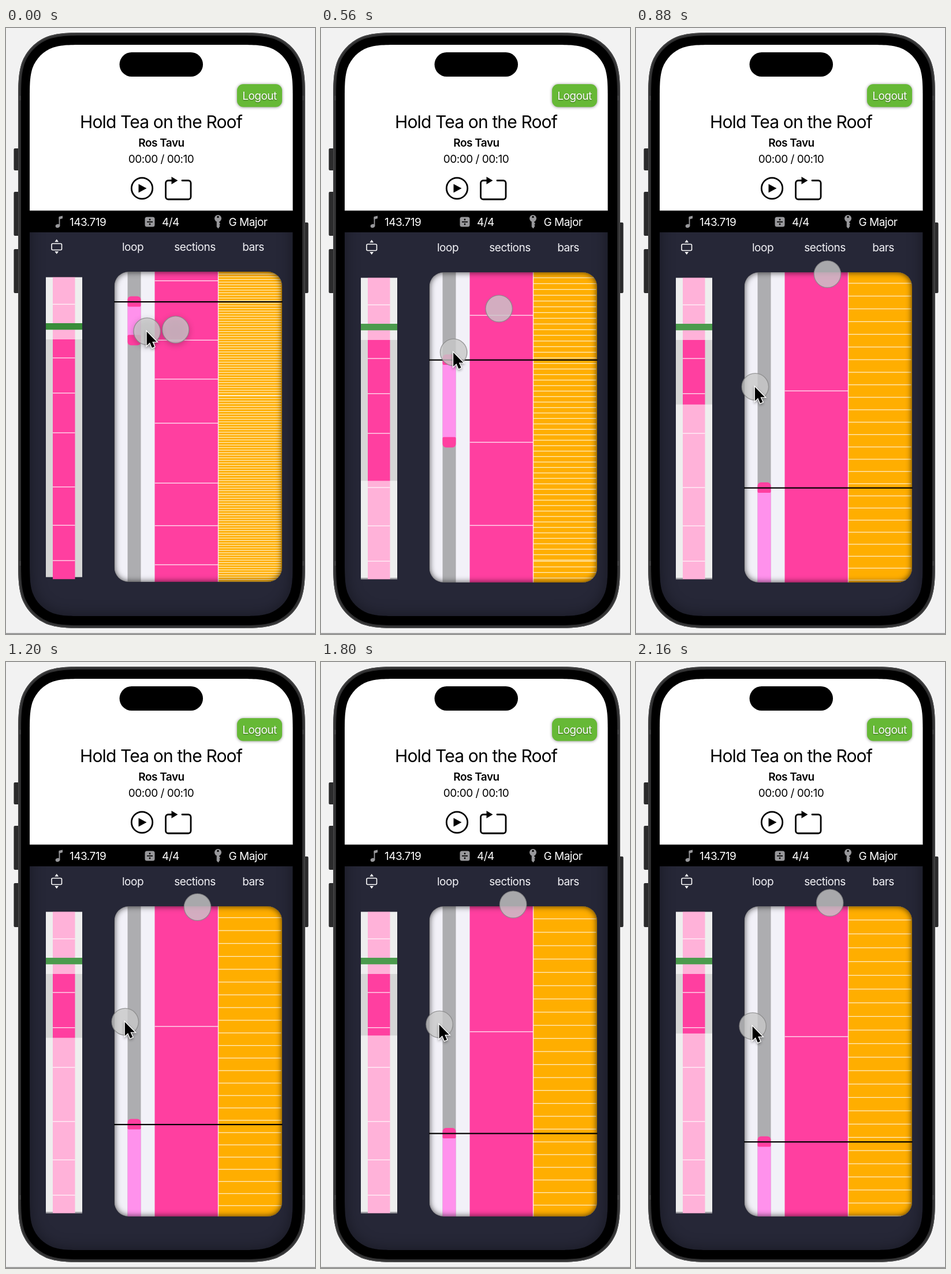
Recreate the animation shown at these times as an HTML page with a canvas. Size 535 by 1047 pixels, loop 2200 ms.

```html
<!DOCTYPE html>
<html lang="en">
<head>
<meta charset="utf-8">
<title>Pinch zoom</title>
<style>
  html, body { margin: 0; width: 100%; height: 100%; overflow: hidden; background: #f2f2f2; }
  canvas { display: block; width: 535px; height: 1047px; }
</style>
</head>
<body>
<canvas id="stage"></canvas>
<script>
const W = 535, H = 1047, LOOP = 2200, STEP = 40;
const canvas = document.getElementById('stage');
const ctx = canvas.getContext('2d');
const dpr = window.devicePixelRatio || 1;
canvas.width = W * dpr;
canvas.height = H * dpr;

const PINK = '#ff3fa0', LILAC = '#ff91ec', NAVY = '#262737', AMBER = '#ffae00';

// Pinch over time: [ms, zoom, half finger distance x, y]
const pinch = [
  [0, 1.108, 24.75, 1.5],
  [400, 1.412, 31.5, 17.5],
  [560, 2.367, 39.25, 37.75],
  [880, 5.165, 62.5, 97.25],
  [1200, 5.222, 62.6, 99],
  [1800, 5.418, 63.75, 103.5],
  [2160, 5.602, 66.75, 106.5]
];
const MID = { x: 268.9, y: 522.6 };
const IDLE_END = 120;

// Positions along the song, in overview pixels
const sections = [46.65, 139.3, 200, 268.7, 362.2, 428.5, 489.5];
const loopStart = 79, loopEnd = 139.3, songLength = 520.5;
const bars = [];
for (let k = -2; k <= 23; k++) bars.push(10.65 + 4.3 * k - 0.0068 * k * k);
for (let k = 1; k <= 30; k++) bars.push(106 + 3.977 * k);
for (let k = 0; k < 76; k++) bars.push(226.2 + 4.07 * k - 0.002 * k * k);

// Monotone cubic through one column of the key list
function track(t, col) {
  const n = pinch.length - 1;
  if (t >= pinch[n][0]) return pinch[n][col];
  const slope = i => (pinch[i + 1][col] - pinch[i][col]) / (pinch[i + 1][0] - pinch[i][0]);
  const tangent = i => {
    if (i === 0) return slope(0) * 0.4;
    if (i === n) return slope(n - 1);
    const a = slope(i - 1), b = slope(i);
    return a * b <= 0 ? 0 : 2 * a * b / (a + b);
  };
  let i = 0;
  while (t >= pinch[i + 1][0]) i++;
  const h = pinch[i + 1][0] - pinch[i][0], u = (t - pinch[i][0]) / h;
  const u2 = u * u, u3 = u2 * u;
  return (2 * u3 - 3 * u2 + 1) * pinch[i][col] + (u3 - 2 * u2 + u) * h * tangent(i) +
    (3 * u2 - 2 * u3) * pinch[i + 1][col] + (u3 - u2) * h * tangent(i + 1);
}

function rect(x, y, w, h, fill) {
  ctx.fillStyle = fill;
  ctx.fillRect(x, y, w, h);
}

function round(x, y, w, h, r, fill, stroke, width) {
  ctx.beginPath();
  ctx.roundRect(x, y, w, h, r);
  if (fill) { ctx.fillStyle = fill; ctx.fill(); }
  if (stroke) { ctx.strokeStyle = stroke; ctx.lineWidth = width; ctx.stroke(); }
}

// Rounded box whose corners ease into the straight sides
function smoothBox(x, y, w, h, r) {
  const far = 1.5287 * r, c1 = 1.0885 * r, c2 = 0.8684 * r;
  const p = 0.6315 * r, q = 0.0749 * r, s = 0.3728 * r, v = 0.1691 * r;
  const corners = [[x, y, 1, 0, 0, 1], [x + w, y, 0, 1, -1, 0],
    [x + w, y + h, -1, 0, 0, -1], [x, y + h, 0, -1, 1, 0]];
  const path = new Path2D();
  corners.forEach(([cx, cy, ax, ay, bx, by], i) => {
    // a runs along the leaving side, b along the arriving side
    const at = (a, b) => [cx + ax * a + bx * b, cy + ay * a + by * b];
    const curve = (...pts) => path.bezierCurveTo(...pts.flat());
    if (i) path.lineTo(...at(0, far)); else path.moveTo(...at(0, far));
    curve(at(0, c1), at(0, c2), at(q, p));
    curve(at(v, s), at(s, v), at(p, q));
    curve(at(c2, 0), at(c1, 0), at(far, 0));
  });
  path.closePath();
  return path;
}

function shape(points, fill) {
  ctx.beginPath();
  points.forEach(([x, y]) => ctx.lineTo(x, y));
  ctx.closePath();
  ctx.fillStyle = fill;
  ctx.fill();
}

function disc(x, y, r, fill) {
  ctx.beginPath();
  ctx.arc(x, y, r, 0, 7);
  ctx.fillStyle = fill;
  ctx.fill();
}

function text(str, x, y, size, color, weight = 400, align = 'center', spacing = -0.5) {
  ctx.font = `${weight} ${size}px Inter, "Open Sans", sans-serif`;
  ctx.letterSpacing = spacing + 'px';
  ctx.textAlign = align;
  ctx.textBaseline = 'alphabetic';
  ctx.fillStyle = color;
  ctx.fillText(str, x, y);
}

function shadow(color, blur, y = 0) {
  ctx.shadowColor = color;
  ctx.shadowBlur = blur * dpr;
  ctx.shadowOffsetY = y * dpr;
}

// Dark blurred edge along the inside of a box path
function innerShadow(box, color, blur) {
  const ring = new Path2D();
  ring.rect(-60, -60, W + 120, H + 120);
  ring.addPath(box);
  ctx.save();
  ctx.clip(box);
  shadow(color, blur);
  ctx.fillStyle = '#000';
  ctx.fill(ring, 'evenodd');
  ctx.restore();
}

function drawPhone() {
  rect(0, 0, W, H, '#f2f2f2');
  rect(0, 1045.5, W, 1.5, '#8a8a8a');
  [[208, 38], [283, 76], [382, 76]].forEach(([y, h]) => round(13.5, y, 10, h, 2, '#2b2b2c'));
  round(514, 336, 9.5, 122, 2, '#2b2b2c');

  const shell = smoothBox(21, 8, 497, 1029, 83);
  ctx.save();
  ctx.clip(shell);
  rect(21, 8, 497, 1029, '#303031');
  rect(21, 117, 497, 8, '#3d3d3e');
  rect(21, 921, 497, 8, '#3d3d3e');
  ctx.strokeStyle = '#414142';
  ctx.lineWidth = 4;
  ctx.stroke(shell);
  ctx.restore();
  ctx.fillStyle = '#000';
  ctx.fill(smoothBox(26, 13, 487, 1019, 78));

  const screen = smoothBox(41, 29, 455.5, 987, 64);
  ctx.save();
  ctx.clip(screen);
  rect(41, 29, 456, 287, '#fff');
  rect(41, 315.5, 456, 38, '#000');
  rect(41, 353, 456, 664, NAVY);
  ctx.restore();
  ctx.save();
  ctx.beginPath();
  ctx.rect(41, 353, 456, 664);
  ctx.clip();
  innerShadow(screen, 'rgba(0,0,0,.4)', 26);
  ctx.restore();
  round(196.5, 42, 144.5, 42, 21, '#000');
}

function drawHeader() {
  ctx.save();
  shadow('rgba(0,0,0,.45)', 5, 0.5);
  round(400, 97, 78, 39.5, 11, '#66b936');
  ctx.restore();
  ctx.save();
  shadow('rgba(0,0,0,.45)', 2, 0.5);
  text('Logout', 439, 124, 19, '#fff');
  ctx.restore();

  text('Hold Tea on the Roof', 268.5, 173, 30, '#000', 400, 'center', -0.85);
  text('Ros Tavu', 269, 205, 19, '#000', 600);
  text('00:00 / 00:10', 268.5, 233, 19, '#000');

  ctx.strokeStyle = '#000';
  ctx.lineWidth = 2.8;
  ctx.lineCap = ctx.lineJoin = 'round';
  ctx.beginPath();
  ctx.arc(235.5, 277, 18.2, 0, 7);
  ctx.stroke();
  shape([[229.5, 269.5], [243.5, 277], [229.5, 284.5]], '#000');

  ctx.beginPath();
  ctx.moveTo(305, 263.5);
  ctx.arcTo(320, 263.5, 320, 280, 4.5);
  ctx.arcTo(320, 296, 300, 296, 4.5);
  ctx.arcTo(276.5, 296, 276.5, 280, 4.5);
  ctx.arcTo(276.5, 263.5, 290, 263.5, 4.5);
  ctx.lineTo(288, 263.5);
  ctx.stroke();
  shape([[286.5, 257], [297.5, 263.5], [286.5, 270]], '#000');
}

function drawInfo() {
  const grey = '#98989b';
  ctx.beginPath();
  ctx.ellipse(89.5, 342, 3.9, 3.1, -0.3, 0, 7);
  ctx.fillStyle = grey;
  ctx.fill();
  rect(91.6, 327, 1.8, 15, grey);
  shape([[91.6, 326], [98, 324.5], [98, 329], [91.6, 330.7]], grey);
  text('143.719', 110, 342, 19, '#fff', 400, 'left');

  round(240.5, 326.5, 17, 17, 3.5, grey);
  rect(244, 334.2, 10, 1.7, '#000');
  disc(249, 331, 1.4, '#000');
  disc(249, 339, 1.4, '#000');
  text('4/4', 270, 342, 19, '#fff', 400, 'left');

  disc(367, 329, 6, grey);
  disc(367, 326.5, 1.7, '#000');
  shape([[364.7, 332], [369.3, 332], [369.3, 336], [371, 338], [369.3, 340], [370.5, 342],
    [367.5, 346.5], [364.7, 343.5]], grey);
  text('G Major', 385.5, 342, 19, '#fff', 400, 'left');
}

function drawLabels() {
  round(79, 373.5, 17.5, 11, 2, null, '#fff', 1.6);
  shape([[87.7, 366], [91, 370.5], [84.4, 370.5]], '#fff');
  shape([[87.7, 391.5], [91, 387], [84.4, 387]], '#fff');
  text('loop', 219.5, 386, 19, '#f4f4f8');
  text('sections', 327, 386, 19, '#f4f4f8');
  text('bars', 428, 386, 19, '#f4f4f8');
}

function drawOverview(zoom, idle) {
  const top = 431.7, viewTop = 539;
  const bottom = top + songLength, viewEnd = viewTop + 576 / zoom;
  rect(69, top, 63, songLength - (idle ? 2.5 : 0), '#d6d6d6');
  rect(81, top, 38.5, songLength + (idle ? 1 : 0), PINK);
  sections.forEach(m => rect(81, top + m - 0.7, 38.5, 1.4, '#ffd9ec'));
  const veil = 'rgba(255,255,255,.6)';
  rect(69, top, 63, viewTop - top, veil);
  if (viewEnd < bottom) rect(69, viewEnd, 63, bottom - viewEnd, veil);
  if (!idle) {
    rect(69, bottom - 2.3, 12, 2.3, '#a3a3a7');
    rect(119.5, bottom - 2.3, 12.5, 2.3, '#a3a3a7');
  }
  rect(69, 511, 63, 11.3, idle ? '#388d3a' : '#4b9b4d');
}

function drawDetail(zoom) {
  const x = 187.5, y = 422, w = 290.5, h = 536;
  const at = m => 386 + m * zoom;
  const visible = m => at(m) > y - 3 && at(m) < y + h + 3;
  const panel = new Path2D();
  panel.roundRect(x, y, w, h, 25);
  ctx.save();
  ctx.clip(panel);
  rect(x, y, w, h, '#f2f1f8');

  rect(210.5, y, 23, h, '#adadb0');
  const a = at(loopStart), b = at(loopEnd);
  rect(210.5, a, 23, b - a, LILAC);
  round(210.5, a - 9, 23, 18, [6, 6, 2, 2], PINK);
  round(210.5, b - 9, 23, 18, [2, 2, 6, 6], PINK);

  rect(257.5, y, 109.5, h, PINK);
  sections.filter(visible).forEach(m => rect(257.5, at(m) - 0.7, 109.5, 1.4, '#ffdcee'));
  rect(368, y, 110, h, AMBER);
  bars.filter(visible).forEach(m => rect(368, at(m) - 0.65, 108.5, 1.3, '#ffecc2'));
  rect(366.8, y, 1.4, h, '#fff1e6');
  ctx.restore();

  innerShadow(panel, 'rgba(0,0,0,.75)', 11);
  rect(x - 0.5, a - 0.5, w + 1, 2.2, '#000');
}

function drawTouch(x, y, idle) {
  ctx.save();
  if (idle) shadow('rgba(0,0,0,.3)', 12, 3);
  disc(x, y, 23.3, 'rgba(200,200,200,.8)');
  ctx.restore();
  ctx.beginPath();
  ctx.arc(x, y, 23.2, 0, 7);
  ctx.strokeStyle = 'rgba(130,130,130,.75)';
  ctx.lineWidth = 1.4;
  ctx.stroke();
}

function drawCursor(x, y) {
  ctx.save();
  ctx.translate(x - 0.5, y + 0.5);
  ctx.scale(0.92, 0.92);
  ctx.beginPath();
  [[0, 0], [0, 26], [5.8, 20.6], [10, 30.2], [14.6, 28.2], [10.4, 18.8], [18.6, 18.8]]
    .forEach(([px, py]) => ctx.lineTo(px, py));
  ctx.closePath();
  ctx.lineJoin = 'miter';
  ctx.save();
  shadow('rgba(0,0,0,.4)', 4, 2);
  ctx.strokeStyle = '#fff';
  ctx.lineWidth = 3;
  ctx.stroke();
  ctx.restore();
  ctx.fillStyle = '#000';
  ctx.fill();
  ctx.restore();
}

function draw(t) {
  const zoom = track(t, 1), dx = track(t, 2), dy = track(t, 3);
  const idle = t < IDLE_END;
  ctx.setTransform(dpr, 0, 0, dpr, 0, 0);
  drawPhone();
  drawHeader();
  drawInfo();
  ctx.save();
  if (idle) ctx.translate(0, -1);
  drawLabels();
  drawOverview(zoom, idle);
  drawDetail(zoom);
  ctx.restore();
  drawTouch(MID.x + dx, MID.y - dy, idle);
  drawTouch(MID.x - dx, MID.y + dy, idle);
  drawCursor(MID.x - dx, MID.y + dy);
}

const start = performance.now();
function tick() {
  const t = (performance.now() - start) % LOOP;
  draw(Math.floor(t / STEP) * STEP);
  requestAnimationFrame(tick);
}
tick();
</script>
</body>
</html>
```
